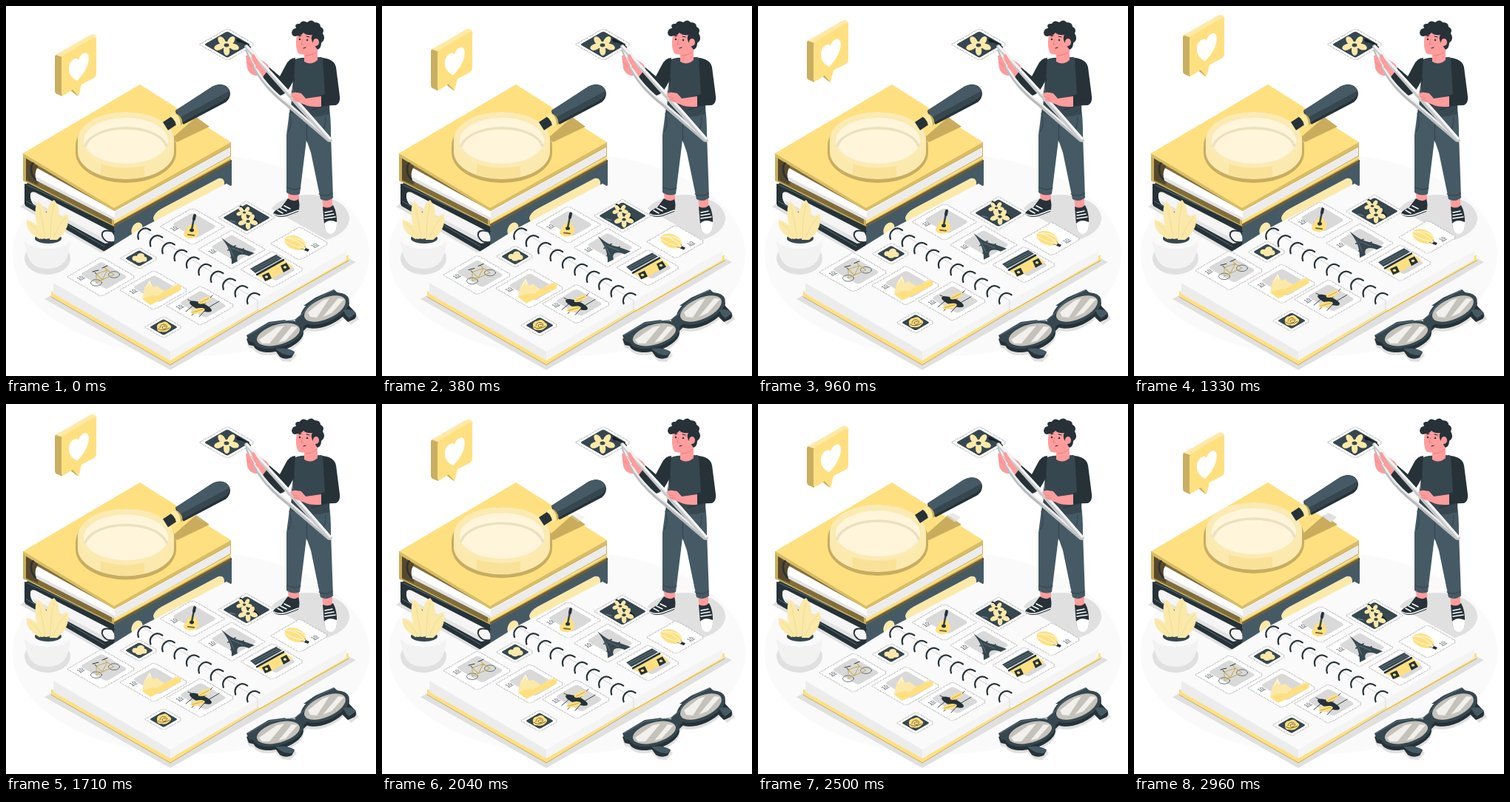
Write an HTML page that moves like this. It is 500 px wide and 500 px high and loops after 3 s.

```html
<!DOCTYPE html>
<html lang="en">
<head>
<meta charset="utf-8">
<title>Stamp collection</title>
<style>
html,body{margin:0;width:100%;height:100%;overflow:hidden;background:#fff}
svg{display:block;width:100vw;height:100vh}
text{font:7px Arial,"Liberation Sans",sans-serif;fill:#37474f;text-anchor:middle;text-decoration:underline}
.l{fill:none;stroke-linecap:round;stroke-linejoin:round}
.y{fill:#ffe080}.p{fill:#fbe9aa}.k{fill:#263238}.d{fill:#37474f}.b{fill:#455a64}
.w{fill:#fff}.g{fill:#e0e0e0}.s{fill:#ff9c9c}
</style>
</head>
<body>
<svg viewBox="0 0 500 500">
<defs>
  <g id="rims">
    <ellipse cx="368" cy="444" rx="35" ry="17" transform="rotate(-16 368 444)"/>
    <ellipse cx="431" cy="409" rx="35" ry="18" transform="rotate(-24 431 409)"/>
    <path d="M325 445L355 427L378 424L350 458L328 453ZM443 383L464 401L460 410L402 405L418 394ZM390 424L402 414L412 424L398 438Z"/>
  </g>
</defs>
<ellipse cx="250" cy="336" rx="241" ry="137" fill="#fafafa"/>
<g class="g">
  <ellipse cx="409" cy="287" rx="55" ry="32"/>
  <ellipse cx="56" cy="341" rx="31" ry="22"/>
  <path d="M19 271L133 336L190 303L60 246ZM52 396L222 492L341 424L473 346L440 330L190 320Z"/>
  <use href="#rims" y="9"/>
  <path d="M328 462L365 471L373 480L384 481L393 472L385 464ZM452 414L466 431L477 423L470 412Z"/>
</g>

<!-- lower folder -->
<path class="k" d="M25 240L146 293L305 208V242L146 332L133 331L25 268Z"/>
<path class="b" d="M146 297L305 210V242L146 330Z"/>
<path class="k" d="M26 241L30 239L147 291L146 298Z"/>
<path fill="#f5f5f5" d="M33 254Q34 250 40 252L141 304Q148 308 146 319L134 321L39 270Q32 264 33 254Z"/>
<path fill="#e2e2e2" d="M36 263L134 315V321L39 270Z"/>
<path class="l" stroke="#263238" stroke-width="2" d="M31 250Q25 258 35 267M146 305Q128 300 130 311Q134 321 146 319"/>
<path class="k" d="M26 262L133 321L146 320V331L133 332L26 270Z"/>
<path class="l" stroke="#607d8b" stroke-width=".8" d="M28 264L133 325M29 242L146 297"/>
<path class="p" d="M199 286Q201 279 210 274L287 233Q296 231 295 242L210 291Q200 296 199 286Z"/>
<ellipse class="p" cx="177" cy="302" rx="7" ry="10" transform="rotate(25 177 302)"/>

<!-- upper folder -->
<path fill="#c9ae5c" d="M23 199L146 274L304 186V211L146 298L23 236Z"/>
<path fill="#806d39" d="M27 206L143 275V295L27 236Z"/>
<path fill="#57492b" d="M27 206L43 216V242L27 235Z"/>
<path class="l" stroke="#263238" stroke-width="2.4" d="M48 212Q34 207 34 220Q34 233 45 237"/>
<path class="w" d="M42 219L147 277L303 191V202L147 290L41 235Q38 226 42 219Z"/>
<path fill="#ececec" d="M147 278L303 191V202L147 290Z"/>
<path fill="#e2e2e2" d="M41 231L147 286V290L41 236Z"/>
<path class="y" d="M23 199L181 106L304 184V188L146 277Z"/>
<path fill="#d9bd66" d="M23 199L146 273L304 184V189L146 277L23 203Z"/>
<path class="y" d="M146 290L304 203V206L146 294Z"/>
<path fill="#6d5d35" d="M146 295L304 208V212L146 298Z"/>
<path fill="#c9ad5c" d="M225 178L257 150L275 163L231 184Z"/>
<path id="tip" class="g" d="M263 147L274 153L266 160L255 152Z"/>

<g id="glass">
  <path fill="#c7ad61" d="M94 190A68 47 0 0 1 230 190V198A68 41 0 0 1 94 198Z"/>
  <path fill="#fbe9ae" d="M97 181A65 38 0 0 1 227 181V197A65 37 0 0 1 97 197Z"/>
  <path fill="#fae198" d="M128 211Q157 222 187 211V231Q157 237 128 228Z"/>
  <ellipse cx="162" cy="181" rx="65" ry="38" fill="#fbeab2"/>
  <ellipse cx="162" cy="182" rx="57" ry="31" fill="#fff5da"/>
  <path class="l" stroke="#ebe1c0" stroke-width="3.5" stroke-linecap="butt" d="M107 189C120 157 204 157 217 189"/>
  <path class="k" d="M212 157L224 149L231 160L219 168Z"/>
  <path class="k" d="M229 142L277 110C289 102 302 107 303 118Q303 125 297 130L240 160Q231 152 229 142Z"/>
  <path class="b" d="M229 141L277 110C289 103 299 107 302 115L235 151Z"/>
  <path class="d" d="M235 151L302 115Q303 122 295 127L239 157Z"/>
  <path fill="#c9ae5c" d="M222 149Q228 142 233 147Q240 153 238 160L230 165Q231 155 222 149Z"/>
  <path fill="#ffeaa0" d="M222 149Q226 143 230 146Q236 151 236 161L230 165Q231 155 222 149Z"/>
</g>

<!-- plant -->
<path fill="#f2f2f2" d="M25 315C27 344 36 355 56 355S86 344 87 315Z"/>
<ellipse cx="56" cy="315" rx="31" ry="13" fill="#fafafa"/>
<ellipse cx="57" cy="314" rx="18" ry="7" class="d"/>
<g class="p">
  <path d="M45 315Q25 303 28 289Q43 292 54 313Z"/>
  <path d="M48 315Q34 279 43 264Q59 274 60 313Z"/>
  <path d="M53 315Q50 271 65 262Q78 277 68 313Z"/>
  <path d="M59 316Q64 285 84 281Q87 302 69 316Z"/>
</g>
<path class="l" stroke="#ecd793" stroke-width=".8" d="M48 312Q40 299 32 294M53 313Q48 285 45 271M60 313Q60 285 65 268M64 314Q70 296 81 285"/>

<!-- album -->
<path class="y" d="M61 385L222 474L341 407L463 336V344L344 414L340 412L222 485L61 392Z"/>
<path class="l" stroke="#c9ae5c" stroke-width="1" d="M61 393L222 485L341 413L463 344"/>
<path fill="#ececec" d="M64 374L222 464V479L64 389Z"/>
<path fill="#f4f4f4" d="M222 464L341 396L460 330V343L343 411L340 410L222 479Z"/>
<path fill="#fafafa" d="M64 374L185 299L298 240L460 331L342 398L222 467Z"/>
<path class="l" stroke="#dedede" stroke-width="1.2" d="M183 300L340 398V410"/>
<g id="stamps"></g>
<g id="rings" class="l" stroke="#263238" stroke-width="2.2"></g>

<!-- eyewear -->
<path class="k" d="M326 451L362 463L370 474Q377 479 386 475L390 468L378 462L334 446ZM446 386L472 414Q475 419 471 423L462 427Q452 418 448 410Z"/>
<use href="#rims" y="5" class="k"/>
<use href="#rims" class="d"/>
<path class="b" d="M364 463Q380 461 390 467L386 472Q374 473 364 463ZM456 411Q466 408 473 415L464 422Q459 419 456 411Z"/>
<g fill="#c4c2bb">
  <ellipse cx="368" cy="444" rx="30" ry="13.5" transform="rotate(-16 368 444)"/>
  <ellipse cx="431" cy="409" rx="30" ry="14" transform="rotate(-24 431 409)"/>
</g>
<path fill="#f1f0ec" d="M342 451L366 434L376 432L356 456L346 456ZM368 455L386 433L394 434L378 452ZM408 414L428 398L437 395L420 421L411 420ZM428 420L449 395L457 396L440 415Z"/>
<path class="l" stroke="#607d8b" stroke-width=".8" d="M327 445L355 429L391 424L403 414Q408 400 443 384"/>

<!-- collector -->
<path class="s" d="M380 250H396V266H383ZM427 259H441V275H429Z"/>
<path class="k" d="M381 260Q389 266 395 261Q398 269 395 278L379 284Q367 287 361 281Q361 277 372 272Z"/>
<path class="k" d="M428 271Q436 275 442 269Q448 280 447 296Q446 307 438 307Q431 305 430 295Z"/>
<path class="w" d="M430 294Q436 287 447 292Q448 305 440 308Q431 308 430 294Z"/>
<path class="l" stroke="#fff" stroke-width="1.5" d="M362 281Q368 285 379 282L395 276M376 270L384 274M371 273L379 277M367 276L374 280M431 279L441 277M431 283L443 281M431 287L445 285"/>
<path class="b" d="M384 136L437 139Q439 150 439 174L442 259Q434 266 425 261L412 198L406 181L397 254Q388 258 379 252V174Z"/>
<path class="l" stroke="#37474f" stroke-width="1.3" d="M380 245Q389 250 398 246M423 254Q433 259 441 253M407 183Q405 165 408 151M383 145Q388 160 381 170M432 150Q432 165 426 170"/>
<path class="d" d="M384 75Q396 69 406 70L426 69Q438 74 438 91L437 146Q410 154 384 144L388 109Z"/>
<path class="l" stroke="#263238" stroke-width="1" d="M413 140Q425 137 433 134M390 98Q387 110 386 119"/>
<path class="k" d="M391 70Q383 70 378 80L370 95L356 83L345 94Q358 111 370 121Q380 120 389 99Z"/>
<path class="k" d="M428 70Q444 72 446 83L451 122Q452 131 446 134L426 135L424 122L431 119Z"/>
<path class="s" d="M426 122L405 125L399 118Q391 116 386 120L390 128L403 133Q411 137 426 136Z"/>
<g transform="translate(1 1)">
  <path class="s" d="M402 60L402 74Q411 80 420 72L420 55ZM392 38Q389 55 394 63Q401 67 412 62Q420 56 423 47L420 33H396Z"/>
  <path class="k" d="M393 39Q386 42 385 35Q386 29 391 29Q388 22 396 23Q399 17 406 21Q412 16 416 21Q424 21 424 27Q430 30 427 36Q432 44 425 49Q425 56 420 58L417 54Q421 46 416 44L414 49Q410 43 413 38Q405 39 401 35Q397 40 393 39Z"/>
  <ellipse class="s" cx="418" cy="48" rx="4" ry="5"/>
  <path class="l" stroke="#263238" stroke-width="1.1" d="M395 40L398 39M405 40L409 41M401 56L404 55"/>
  <circle class="k" cx="396" cy="44" r="1.2"/><circle class="k" cx="406" cy="45" r="1.2"/>
  <path class="l" stroke="#e97d80" stroke-width="1" d="M400 44L398 51H401M404 66Q412 66 418 61"/>
</g>
<g id="held"></g>
<path class="s" d="M324 67Q327 66 329 69L335 64Q341 71 348 75Q354 78 356 84L347 96Q342 93 337 94Q329 93 326 84Z"/>
<g class="l">
  <path stroke="#b9bcbe" stroke-width="5" d="M326 60C338 91 351 111 381 134L436 181"/>
  <path stroke="#eee" stroke-width="2.7" d="M327 60C339 91 352 109 382 132L436 179"/>
  <path stroke="#37474f" stroke-width="4" d="M317 51L329 56"/>
  <path stroke="#c7c9ca" stroke-width="5.5" d="M325 55L402 142L438 181"/>
  <path stroke="#f5f5f5" stroke-width="3.3" d="M326 55L404 140L438 179"/>
</g>
<path class="s" d="M384 119Q391 114 397 119L406 126L401 132L391 129Z"/>
<path class="l" stroke="#ff9c9c" stroke-width="4" d="M327 70L333 80M334 67L341 79M339 82L349 90"/>
<path class="l" stroke="#e97d80" stroke-width=".8" d="M326 76L332 82M331 70L337 79M386 122L394 125M388 126L396 128"/>

<g id="bubble">
  <path fill="#c9ae62" d="M69 65L76 68V122L69 119Q66 118 66 114V69Q66 66 69 65Z"/>
  <path fill="#ffe9a6" d="M67 66L114 39Q118 37 121 40L123 44L76 69Z"/>
  <path fill="#c9ae62" d="M87 114L97 122L93 110Z"/>
  <path class="y" d="M79 66L118 43Q122 41 122 46V92Q122 95 119 97L102 106L98 122L90 113L79 120Q75 122 75 118V72Q75 68 79 66Z"/>
  <path class="w" d="M98 73C101 62 112 59 112 71C111 83 104 93 96 101C90 98 85 93 85 85C85 73 95 68 98 73Z"/>
</g>
</svg>
<script>
const $ = id => document.getElementById(id);
const ISO = 'matrix(.866 -.5 .866 .5 0 0)';
const rect = (x, y, w, h, rest) => `<rect x="${x}" y="${y}" width="${w}" height="${h}" ${rest}/>`;
const square = (s, rest) => rect(-s / 2, -s / 2, s, s, rest);
const path = (d, cls = 'y') => `<path class="${cls}" d="${d}"/>`;
const line = (d, color = '#263238', width = 1) =>
  `<path class="l" stroke="${color}" stroke-width="${width}" d="${d}"/>`;
const oval = (x, y, rx, ry, turn, cls) =>
  `<ellipse class="${cls}" rx="${rx}" ry="${ry}" transform="translate(${x} ${y}) rotate(${turn})"/>`;

// Perforated isometric paper; the artwork stays in screen coordinates.
function stamp(x, y, size, kind, art, mark = [-18, -13]) {
  const step = size * 4 / Math.round(size * 4 / 4.4);
  const edge = (color, width) =>
    `fill="#fff" stroke="${color}" stroke-width="${width}" stroke-linecap="round" stroke-dasharray="0 ${step}"`;
  const inner = {
    dark: square(size - 3, 'rx="2.5" class="d"'),
    grey: rect(-13, 4 - size / 2, size / 2 + 9, size - 8, 'rx="4" fill="#d9d9d9"'),
    white: ''
  }[kind];
  const price = kind == 'dark' || !mark ? '' : `<text x="${mark[0]}" y="${mark[1]}">10</text>`;
  return `<g transform="translate(${x} ${y})"><g transform="${ISO}">
    ${square(size, edge('#b4b4b4', 5.8))}${square(size, edge('#fff', 4.5))}${inner}${price}</g>${art}</g>`;
}

function flower(x, y, r) {
  let out = '';
  for (let i = 0; i < 5; i++) {
    const a = i * 2 * Math.PI / 5 + .3;
    out += oval(x + r * .56 * Math.cos(a), y + r * .38 * Math.sin(a), r * .36, r * .22, i * 72 + 17, 'p');
  }
  return out + oval(x, y, r * .4, r * .26, 0, 'p') + oval(x, y, r * .18, r * .13, 0, 'd');
}

const ring = (x, y) => `<ellipse cx="${x}" cy="${y}" rx="7.5" ry="4.3" class="l" stroke="#455a64" stroke-width=".8"/>`;

const bike = ring(-7, 8) + ring(17, -3) +
  line('M-7 8L-7-4L8-9L1 4L-7 8M-7-4L1 4L17-3L8-9L4-13', '#c9ae5c', 1.1) +
  line('M-12-7L-4-9M1-12L8-15M-9-6L-7-4');

const guitar = path('M-8 5Q-9 0-4-1Q-3-5 2-4Q6-3 5 1Q9 4 8 10Q4 17-5 16Q-13 14-12 9Q-11 6-8 5Z') +
  line('M-1 4L2-11', '#37474f', 2.6) + line('M2-10L3-15', '#263238', 4) +
  oval(-1, 5, 3, 2.3, 0, 'k') + line('M-6 11L2 12', '#806d39', 2);

const tower = path('M-14-16L-5-9Q3-3 14-1L31 5L23 9Q15 5 9 8Q6 11 8 16L0 20Q0 10-3 2Q-6-6-14-16Z', 'd') +
  line('M-5 1L5-5M-1 11L16-1', '#37474f', 1.8) + line('M-4-5L3 10M0-2L15 4', '#78909c', .6);

const balloon = oval(-6, -1, 15, 9, 20, 'y') +
  line('M-18-7Q-5-7 6 5M-15-8Q5-7 8 2M-19-3Q-8 4 4 6', '#fff4c8', 1.3) +
  line('M7 4L9 7M2 7L8 9', '#806d39', .7) + path('M8 6L13 8L11 11L6 9Z', 'k');

const house = path('M-21 8L15-13L28-4L-7 16Z') +
  path('M-30-1L5-20L13-15L-23 5Z', 'd') + line('M-27 0L8-18M-25 2L10-16', '#78909c', .6) +
  line('M-21 7L15-13', '#263238', 2.6) +
  path('M-14 8L-5 4L-1 12L-10 16ZM11-5L19-9L24-1L15 4Z', 'k') +
  oval(-8, 10, 2.2, 1.8, 0, 'y') + oval(17, -3, 2.2, 1.8, 0, 'y');

const hills = path('M-16 11L-13-3L-6-12L-1-4L4-6L15 2L29-8L37-6L-4 18Z', 'p') +
  path('M-16 12Q-4 5 5 8Q16-3 37-7L36 0L-5 20Z') + line('M-10-4L-6-12L-4-6', '#fff6d6', 1.5);

const fly = line('M-20 8L-8-2M-12 13L2 1L16-14M-2 15L8 4L25-6M-17-8L-10-5', '#263238', .9) +
  oval(0, 1, 16, 5, 22, 'k') +
  oval(5, -7, 9, 3.6, -22, 'y') + oval(-4, 7, 10, 3.6, -12, 'y') +
  line('M-1-4L11-10M-11 9L3 5', '#a98e45', .7);

const cloud = oval(-5, 0, 4.5, 3.5, 0, 'p') + oval(2, -3, 5, 4, 0, 'p') + oval(6, 1, 4.5, 3.5, 0, 'p') + oval(0, 3, 5, 3, 0, 'p');
const rose = path('M-9 1Q-10-5-3-6Q3-10 7-4Q13-1 8 3Q3 8-3 6Q-9 7-9 1Z') +
  line('M-5 1Q-5-4 1-4Q7-2 3 2Q-2 4-2 0Q1-3 3-1M-8 2Q-2 7 8 1', '#806d39', 1);
const blooms = line('M-8-15L2-5L15 6', '#171f23', 3) + flower(-3, -7, 12) + flower(2, 5, 15) +
  line('M-22 4L-15 6', '#78909c', 1);

$('stamps').innerHTML =
  stamp(325, 286, 40, 'dark', blooms) +
  stamp(252, 298, 46, 'grey', guitar, [-17, -10]) +
  stamp(305, 329, 48, 'grey', tower, [-18, -11]) +
  stamp(397, 321, 41, 'white', balloon, [9, 16]) +
  stamp(360, 356, 45, 'grey', house, null) +
  stamp(180, 341, 25, 'dark', cloud) +
  stamp(129, 366, 49, 'grey', bike) +
  stamp(200, 384, 49, 'grey', hills) +
  stamp(263, 405, 49, 'grey', fly) +
  stamp(213, 434, 25, 'dark', rose);
$('held').innerHTML = stamp(299, 52, 39, 'dark', flower(-1, 1, 19) + line('M14-6L28 2', '#171f23', 4));

for (let i = 0; i < 10; i++) {
  const x = 186 + i * 16.4, y = 307 + i * 9.7;
  $('rings').innerHTML += `<path d="M${x - 7} ${y + 8}c-3-9 6-19 16-12"/>`;
}

const lift = (id, dy) => $(id).setAttribute('transform', `translate(0 ${-dy})`);
function draw() {
  const t = performance.now() % 3000;
  const rise = t < 1460 ? t / 1460 : Math.max(0, (2960 - t) / 1500);
  const hover = Math.max(0, (t - 1480) / 1480); // drops back hard at the loop
  lift('bubble', 29 * rise);
  lift('stamps', 9.5 * rise);
  lift('glass', 10 * hover);
  $('tip').style.opacity = Math.min(1, hover);
  requestAnimationFrame(draw);
}
draw();
</script>
</body>
</html>
```
